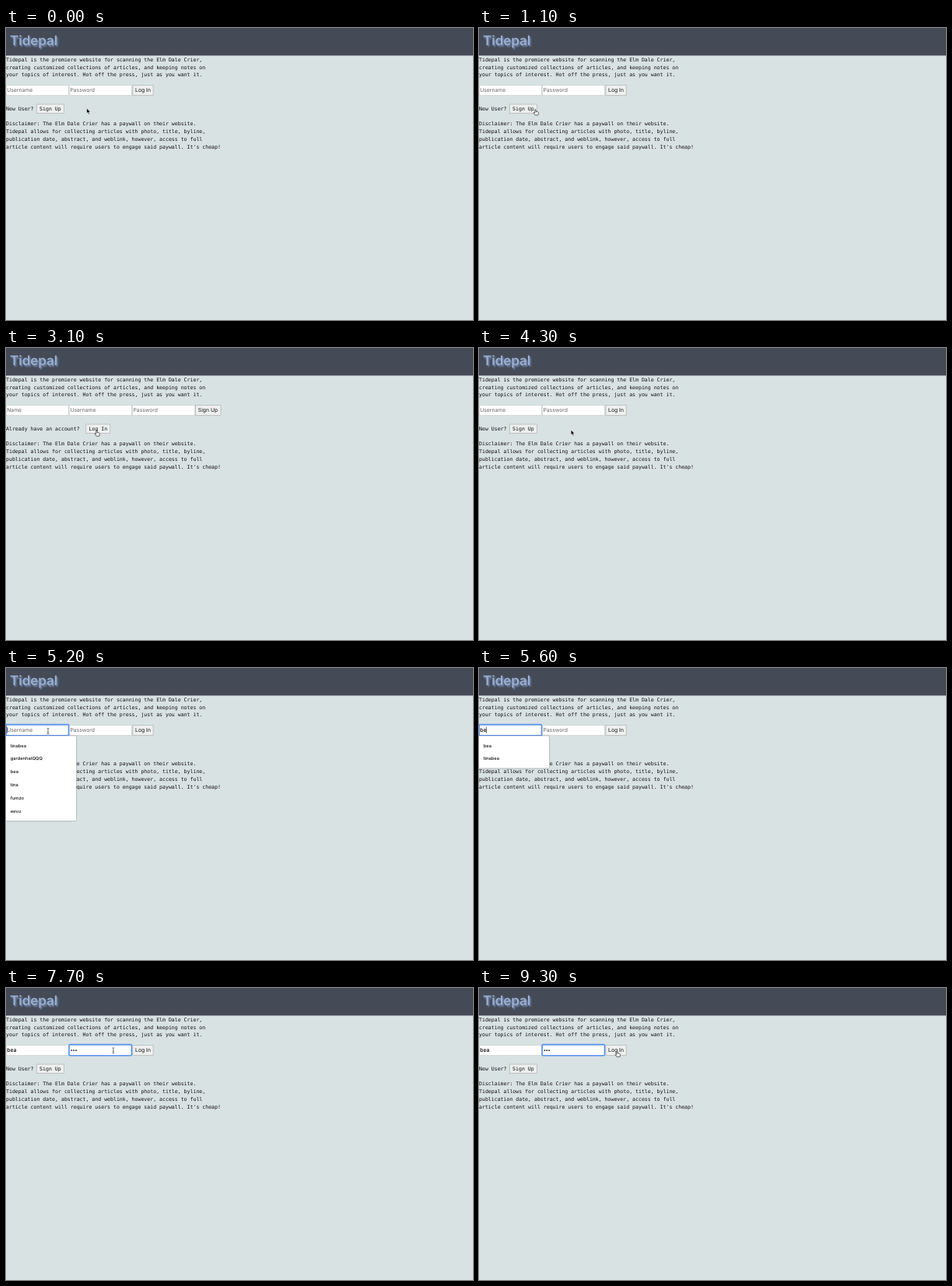
An HTML page for the animation above (9700 ms loop, 600 by 375 pixels).

```html
<!DOCTYPE html>
<html lang="en">
<head>
<meta charset="utf-8">
<title>Tidepal</title>
<style>
  html, body { margin: 0; width: 100%; height: 100%; overflow: hidden; background: #d9e2e2; }
  h1 {
    position: absolute; left: 5px; top: 6px; margin: 0;
    font: 600 17px/22px Inter, sans-serif; color: #9cb1d0;
    text-shadow: 1.5px 1.5px 2px #7189b0;
    text-rendering: geometricPrecision;
  }
  svg { position: absolute; top: 0; left: 0; text-rendering: geometricPrecision; }
  text { white-space: pre; fill: #111; }
  .bar { fill: #454a57; }
  .mono { font: 6.565px "DejaVu Sans Mono", monospace; }
  .ui { font: 6.8px Inter, sans-serif; }
  .hint { fill: #666; }
  .value { font-weight: 500; fill: #000; }
  .item { font: 500 5.75px Inter, sans-serif; }
  .field { fill: #fff; stroke: #c3c9c9; stroke-width: .6; }
  .button { fill: #eeefef; stroke: #a4a8a8; stroke-width: .6; }
  .ring { fill: none; stroke: #5a94f4; stroke-width: 1.6; }
  .menu { fill: #fff; filter: drop-shadow(0 .5px .8px #0006); }
</style>
</head>
<body>
<svg id="stage" width="600" height="375" viewBox="0 0 600 375"></svg>
<h1>Tidepal</h1>
<script>
const LOOP = 9700, TICK = 100;
const USER = 'bea';
const NAMES = ['tinabea', 'gardenhatQQQ', 'bea', 'tina', 'fumzo', 'eevu'];

const text = (x, y, str, cls = 'mono') => `<text x="${x}" y="${y}" class="${cls}">${str}</text>`;
const rect = (x, y, w, h, cls, r = 0) =>
  `<rect x="${x}" y="${y}" width="${w}" height="${h}" rx="${r}" class="${cls}"/>`;
const group = (id, body) => `<g id="${id}">${body}</g>`;
const lines = (y, rows) => rows.map((row, i) => text(0, y + i * 9.87, row)).join('');
const field = x => rect(x + .3, 73.3, 80, 13.3, 'field');
const hint = (x, str) => text(x + 1.2, 82.3, str, 'ui hint');
const submit = (x, w, str) => rect(x, 73.3, w, 13.3, 'button') + text(x + 3.2, 82.3, str, 'ui');
const toggle = (x, w, str) => rect(x, 98, w, 11.6, 'button') + text(x + 3.7, 106.1, str);
const menu = (id, names) => group(id, rect(-2, 87.3, 92, 7.6 + names.length * 16.85, 'menu', 1.5) +
  names.map((name, i) => text(5.7, 101.6 + i * 16.85, name, 'item')).join(''));

const arrow = `<path d="M0 0V6.4L1.5 5.1 2.5 7.5 3.7 7 2.7 4.7H4.7Z"
  fill="#000" stroke="#fff" stroke-width=".5"/>`;
const beam = `<path d="M-1.5-3.6Q0-3.6 0-2.8Q0-3.6 1.5-3.6M0-2.8V2.8M-1.5 3.6Q0 3.6 0 2.8Q0 3.6 1.5 3.6M-.8 .9H.8"
  fill="none" stroke="#222" stroke-width=".6"/>`;
const hand = `<path d="M-.8 .6Q-.2-.4 .4 .6V2.9L3 3.4Q4 3.8 3.8 5L3.2 7.6H-.6L-2.6 4.8Q-2.6 3.8-1.6 4.2L-.8 4.8Z"
  fill="#fff" stroke="#111" stroke-width=".65"/>`;

const stage = document.getElementById('stage');
stage.innerHTML =
  rect(0, 0, 600, 35.4, 'bar') +
  lines(42.7, [
    'Tidepal is the premiere website for scanning the Elm Dale Crier,',
    'creating customized collections of articles, and keeping notes on',
    'your topics of interest. Hot off the press, just as you want it.'
  ]) +
  lines(124.9, [
    'Disclaimer: The Elm Dale Crier has a paywall on their website.',
    'Tidepal allows for collecting articles with photo, title, byline,',
    'publication date, abstract, and weblink, however, access to full',
    "article content will require users to engage said paywall. It's cheap!"
  ]) +
  group('login',
    field(0) + group('userHint', hint(0, 'Username')) + group('user', '') +
    field(81.2) + group('passHint', hint(81.2, 'Password')) + group('dots', '') +
    submit(162.9, 26.2, 'Log In') +
    text(0, 106.1, 'New User?') + toggle(39.4, 35, 'Sign Up')) +
  group('signup',
    field(0) + hint(0, 'Name') + field(81.2) + hint(81.2, 'Username') +
    field(162.3) + hint(162.3, 'Password') + submit(243.6, 32.4, 'Sign Up') +
    text(0, 106.1, 'Already have an account?') + toggle(102.8, 31, 'Log In')) +
  group('userRing', rect(.2, 72.6, 80.3, 14.2, 'ring', 1)) +
  group('passRing', rect(81.1, 72.6, 80.3, 14.2, 'ring', 1)) +
  menu('allNames', NAMES) + menu('matches', [USER, 'tinabea']) +
  '<rect id="caret" y="75.8" width=".6" height="8" fill="#111"/>' +
  group('cursor', group('arrow', arrow) + group('beam', beam) + group('hand', hand));

const el = Object.fromEntries([...stage.querySelectorAll('[id]')].map(n => [n.id, n]));
const show = (id, on) => { el[id].style.display = on ? '' : 'none'; };

const inOut = p => p < .5 ? 4 * p ** 3 : 1 - 4 * (1 - p) ** 3;
const smooth = p => p * p * (3 - 2 * p);
const out = p => 1 - (1 - p) ** 1.5;
// start, steps, from, to, easing
const MOVES = [
  [700, 7, [103.7, 103.2], [65, 104.6], smooth],
  [2500, 8, [65, 104.6], [119, 105.6], smooth],
  [4300, 6, [119.4, 105.6], [54, 81], inOut],
  [7300, 10, [65, 79.5], [177.7, 80.8], out]
];

function pointer(t) {
  const [start, steps, from, to, ease] = MOVES.findLast(m => t >= m[0]) || MOVES[0];
  const p = Math.min(1, Math.max(0, (t - start + TICK) / (steps * TICK)));
  return from.map((v, i) => v + (to[i] - v) * ease(p));
}

function cursorKind(x, y, signup) {
  if (y > 73 && y < 87) return x < 162 ? 'beam' : x < 189 ? 'hand' : 'arrow';
  if (y < 98 || y > 110) return 'arrow';
  const [textEnd, left, right] = signup ? [95, 102.8, 134] : [36, 39.4, 74.5];
  return x < textEnd ? 'beam' : x > left && x < right ? 'hand' : 'arrow';
}

const count = (t, times) => times.filter(at => t >= at).length;

function draw(now) {
  const t = Math.floor(now % LOOP / TICK) * TICK;
  const signup = t >= 1500 && t < 3700;
  show('login', !signup);
  show('signup', signup);

  const typed = count(t, [5500, 5600, 5700]);
  const dots = count(t, [6400, 6700, 6800]);
  el.user.innerHTML = text(1.3, 82.3, USER.slice(0, typed), 'ui value');
  el.dots.innerHTML = Array.from({ length: dots },
    (_, i) => `<circle cx="${84.3 + i * 2.85}" cy="80.1" r=".95" fill="#111"/>`).join('');
  show('userHint', !typed);
  show('passHint', !dots);

  const inUser = t >= 5100 && t < 5900, inPass = t >= 5900;
  show('userRing', inUser);
  show('passRing', inPass);
  show('allNames', t >= 5200 && t < 5500);
  show('matches', t >= 5500 && t < 5900);

  const lastKey = [5100, 5500, 5600, 5700, 5900, 6400, 6700, 6800].findLast(at => t >= at);
  show('caret', (inUser || inPass) && Math.floor((t - lastKey) / 500) % 2 === 0);
  el.caret.setAttribute('x', inPass ? 82 + (dots && .9 + dots * 2.85) : 1.2 + typed * 4.1);

  const [x, y] = pointer(t);
  // The cursor catches up with a page switch one tick later.
  const kind = cursorKind(x, y, t >= 1600 && t < 3800);
  show('cursor', t < 5500 || t >= 7300);
  for (const k of ['arrow', 'beam', 'hand']) show(k, k === kind);
  el.cursor.setAttribute('transform', `translate(${x} ${y})`);
}

const begin = performance.now();
function frame() {
  draw(performance.now() - begin);
  requestAnimationFrame(frame);
}
frame();
</script>
</body>
</html>
```
